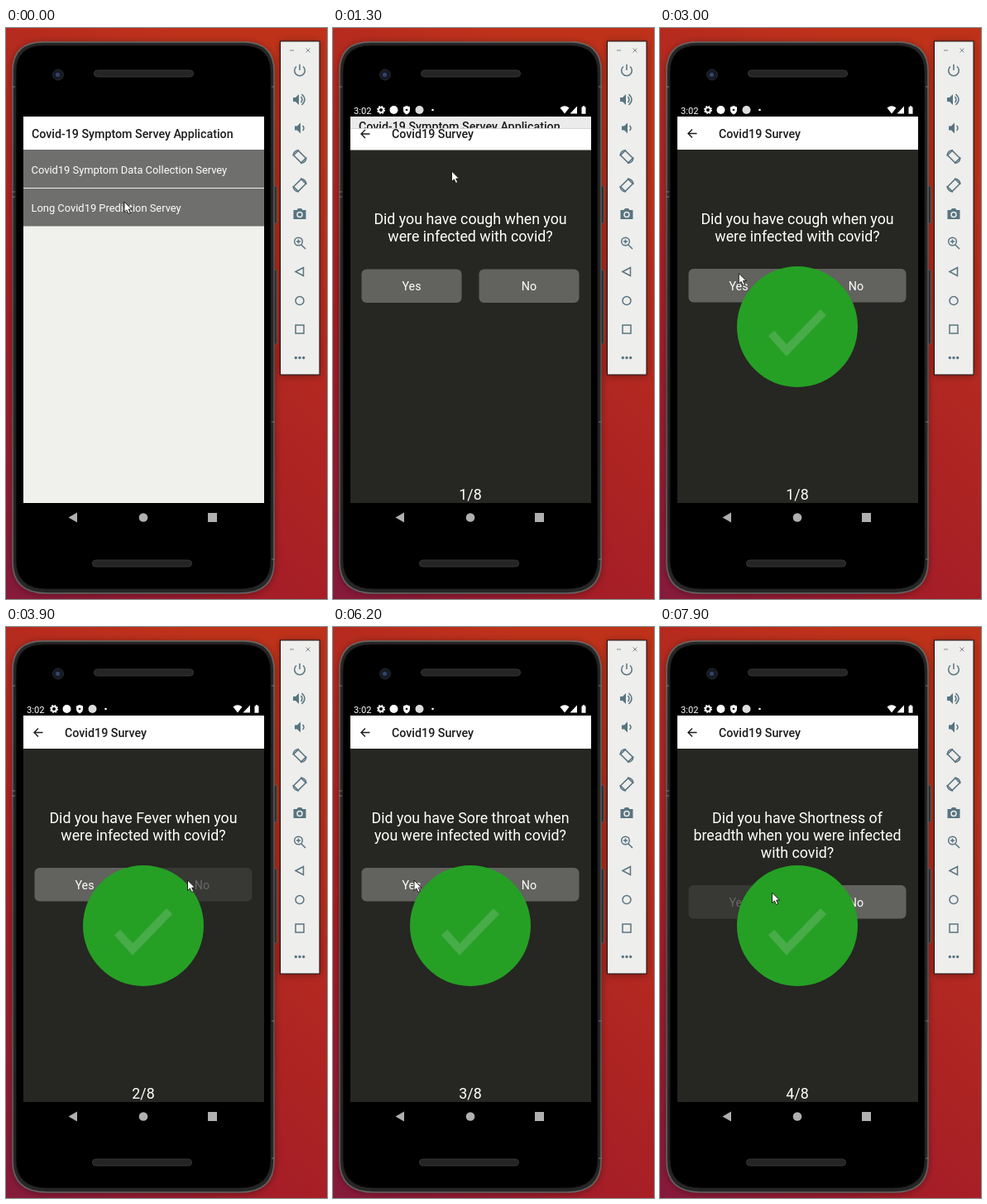
Write an HTML page that moves like this. It is 388x690 px and loops after 8000 ms.

```html
<!DOCTYPE html>
<html lang="en">
<head>
<meta charset="utf-8">
<title>Symptom survey</title>
<style>
  html, body { margin: 0; width: 100%; height: 100%; overflow: hidden; background: #b3271f; }
  svg { display: block; width: 388px; height: 690px; font-family: Roboto, sans-serif; }
  .title { font-size: 14.25px; font-weight: 500; fill: #1b1b1d; }
  .item { font-size: 12.9px; fill: #fff; }
  .question, .count { font-size: 17.8px; fill: #fff; text-anchor: middle; }
  .button { font-size: 14.25px; fill: #fff; text-anchor: middle; }
  .button rect { fill: #62625f; }
  .line { fill: none; stroke: #587480; stroke-width: 1.5; }
  .solid { fill: #587480; }
</style>
</head>
<body>
<svg viewBox="0 0 388 690">
  <defs>
    <linearGradient id="wall" x1="0" y1="1" x2=".55" y2="0">
      <stop offset="0" stop-color="#851a3c"/>
      <stop offset=".35" stop-color="#a51d27"/>
      <stop offset="1" stop-color="#bf321a"/>
    </linearGradient>
    <linearGradient id="rim" x1="0" y1="0" x2="0" y2="1">
      <stop offset="0" stop-color="#686866"/>
      <stop offset=".5" stop-color="#50504e"/>
      <stop offset="1" stop-color="#636361"/>
    </linearGradient>
    <filter id="shadow" x="-20%" y="-10%" width="140%" height="120%">
      <feDropShadow dx="0" dy="1" stdDeviation="4" flood-opacity=".35"/>
    </filter>
    <clipPath id="screen"><rect x="21" y="107" width="291" height="467"/></clipPath>
    <clipPath id="reveal"><rect id="revealBox" x="20" y="107" width="293" height="468"/></clipPath>
  </defs>

  <rect width="388" height="690" fill="url(#wall)"/>

  <!-- phone -->
  <g fill="#3a3a3a" stroke="#777" stroke-width=".7">
    <rect x="322" y="191" width="5.5" height="45" rx="1.5"/>
    <rect x="322" y="292" width="5.5" height="90" rx="1.5"/>
  </g>
  <path d="M8 52Q8 17 45 17H287Q324 17 324 52V645Q324 683 283 683H49Q8 683 8 645Z" fill="#282827" stroke="url(#rim)" stroke-width="1.600" filter="url(#shadow)"/>
  <path d="M12 54Q12 21 46 21H286Q320 21 320 54V643Q320 678 282 678H50Q12 678 12 643Z" fill="#000" stroke="#181818"/>
  <path d="M7 71h4M7 198h4M7 204h4M321 71h4M321 476h4M321 642h4" stroke="#777"/>
  <g fill="#242424" stroke="#363636">
    <rect x="106.500" y="51" width="120" height="8" rx="4"/>
    <rect x="104.500" y="643" width="120" height="8" rx="4"/>
  </g>
  <circle cx="63" cy="56.500" r="6.500" fill="#151a24" stroke="#25282e"/>
  <circle cx="62.500" cy="56.500" r="2.500" fill="#34466e"/>
  <g fill="#b0b0b0">
    <path d="M75.500 591.500L86 585.500V597.500Z"/>
    <circle cx="166" cy="591.500" r="5.300"/>
    <rect x="244" y="586" width="11" height="11"/>
  </g>

  <g id="status" fill="#fff">
    <text x="25" y="103.500" font-size="11.200">3:02</text>
    <circle cx="58" cy="99" r="3" fill="none" stroke="#fff" stroke-width="2"/>
    <circle cx="58" cy="99" r="4.300" fill="none" stroke="#fff" stroke-width="1.500" stroke-dasharray="1.700 1.680"/>
    <circle cx="73.500" cy="99" r="5"/>
    <path d="M89 94l4 1.500v3.500q0 3.500-4 5.500q-4-2-4-5.500v-3.500z"/>
    <circle cx="89" cy="99" r="1.300" fill="#000"/>
    <circle cx="104.500" cy="99" r="5" fill="#ddd"/>
    <circle cx="120.500" cy="99" r="1.300"/>
    <path d="M274.500 96.500Q280 92 285.500 96.500L280 103.500ZM295 94.500V103.500H286.500ZM300.500 95.500h1.300v-1.200h2.400v1.200h1.300v8.300h-5z"/>
  </g>

  <!-- app -->
  <g clip-path="url(#screen)">
    <g id="home">
      <rect x="20" y="107" width="293" height="468" fill="#f0f1ed"/>
      <g id="menu">
        <rect x="20" y="97" width="293" height="50" fill="#fff"/>
        <text class="title" x="31" y="133">Covid-19 Symptom Servey Application</text>
        <g id="firstItem">
          <rect x="20" y="147" width="293" height="46" fill="#6f6f6d"/>
          <text class="item" x="30.500" y="175.500">Covid19 Symptom Data Collection Servey</text>
        </g>
        <rect x="20" y="194" width="293" height="45.500" fill="#6f6f6d"/>
        <text class="item" x="30.500" y="222">Long Covid19 Prediction Servey</text>
      </g>
      <rect id="shade" x="20" y="107" width="293" height="468"/>
    </g>

    <g clip-path="url(#reveal)">
      <rect x="20" y="107" width="293" height="468" fill="#262622"/>
      <g id="survey">
        <rect x="20" y="90" width="293" height="57" fill="#fff"/>
        <path d="M44.500 127.500H34M39 122.500L34 127.500L39 132.500" fill="none" stroke="#1b1b1d" stroke-width="1.400"/>
        <text class="title" x="71" y="133">Covid19 Survey</text>
        <g id="question" class="question"></g>
        <g id="buttons">
          <g class="button" id="yes"><rect x="34.500" y="291" width="121" height="40.500" rx="6"/><text x="95" y="317">Yes</text></g>
          <g class="button" id="no"><rect x="176.500" y="291" width="121" height="40.500" rx="6"/><text x="237" y="317">No</text></g>
        </g>
        <text id="count" class="count" x="166" y="570"></text>
        <g id="done">
          <circle cx="166" cy="361" r="73" fill="#25a025"/>
          <path d="M134.500 369L153 389.500L197.500 343.500" fill="none" stroke="#48ac48" stroke-width="10"/>
        </g>
      </g>
    </g>
  </g>

  <!-- emulator toolbar -->
  <rect x="331.500" y="16" width="47.500" height="403" fill="#eeeeec" stroke="#1a1010" filter="url(#shadow)"/>
  <path d="M343 27h5M362.500 24.500l5 5M367.500 24.500l-5 5" stroke="#7d8a90"/>
  <g transform="translate(355 0)">
    <path class="line" d="M0 44V51M-4 46.500A6.300 6.300 0 1 0 4 46.500"/>
    <path class="solid" d="M-8 84h3l4-4v13l-4-4h-3zM-6 118.500h3l4-4v13l-4-4h-3z"/>
    <path class="line" d="M1.500 83q3 3.500 0 7M2.500 80q7 6.500 0 13M3.500 118q3 3 0 6"/>
    <g id="rotate" class="line">
      <rect x="-4" y="-6.500" width="8" height="13" transform="translate(0 155.500) rotate(-45)"/>
      <path d="M-8 154.500Q-7.500 148 -1 147.500M1 163.500Q7.500 163 8 156.500"/>
    </g>
    <use href="#rotate" transform="translate(0 34.500) scale(-1 1)"/>
    <path class="solid" d="M-7.500 220h4l1.500-2h4l1.500 2h4v11h-15z"/>
    <circle cy="225.500" r="3" fill="#587480" stroke="#eee" stroke-width="1.500"/>
    <path class="line" d="M2 262L7 267M-4 258h5M-1.500 255.500v5"/>
    <circle class="line" cx="-1.500" cy="258" r="4.800"/>
    <path class="line" d="M-5 294.500L4.500 289.500V299.500Z"/>
    <circle class="line" cy="329.500" r="5"/>
    <rect class="line" x="-5" y="359" width="10" height="10"/>
    <path d="M-4.700 398.500h.01M0 398.500h.01M4.700 398.500h.01" stroke="#587480" stroke-width="3.400" stroke-linecap="round"/>
  </g>

  <path id="cursor" d="M0 0V12.500L2.900 9.900L5 14.500L7.200 13.500L5.200 9H9Z" fill="#fff" stroke="#111" stroke-width=".9"/>
</svg>
<script>
const LOOP = 8000, STEP = 100;
const OPEN = 1060, OPEN_TIME = 412, STATUS_AT = 1000;

// Each question appears at `from`; its answer is tapped at `tap`.
const questions = [
  { from: 0, tap: 2400, answer: 'yes', lines: ['Did you have cough when you', 'were infected with covid?'] },
  { from: 3100, tap: 3900, answer: 'no', lines: ['Did you have Fever when you', 'were infected with covid?'] },
  { from: 4600, tap: 5800, answer: 'yes', lines: ['Did you have Sore throat when', 'you were infected with covid?'] },
  { from: 6500, tap: 7900, answer: 'yes', lines: ['Did you have Shortness of', 'breadth when you were infected', 'with covid?'] },
];

// Pointer stops: time, x, y
const stops = [
  [0, 143, 210], [300, 143, 210], [800, 143.5, 173], [1400, 143.5, 173],
  [2100, 88, 296], [2900, 88, 296], [3600, 219.5, 306], [4400, 219.5, 306],
  [5300, 98, 306], [6200, 98, 306], [6900, 154, 312], [7300, 154, 312],
  [7700, 135.5, 321], [8000, 135.5, 321],
];

const el = id => document.getElementById(id);
const clamp = v => Math.min(1, Math.max(0, v));
const smooth = u => u * u * (3 - 2 * u);
const shift = (id, x, y) => el(id).setAttribute('transform', `translate(${x} ${y})`);
const show = (id, on) => el(id).style.display = on ? '' : 'none';

function pointerAt(t) {
  const i = stops.findIndex(s => s[0] > t);
  const [t0, x0, y0] = stops[i - 1], [t1, x1, y1] = stops[i];
  const k = smooth((t - t0) / (t1 - t0));
  return [x0 + (x1 - x0) * k, y0 + (y1 - y0) * k];
}

// Opacity of a control tapped at the given time: dims, then recovers
const pressed = (t, tap, low) => t < tap ? 1 : low + (1 - low) * clamp((t - tap - 150) / 250);

let current;
function setQuestion(q) {
  if (q === current) return;
  current = q;
  el('question').innerHTML = q.lines.map((s, i) => `<text x="166" y="${237 + i * 21}">${s}</text>`).join('');
  el('count').textContent = `${questions.indexOf(q) + 1}/8`;
  shift('buttons', 0, (q.lines.length - 2) * 21);
}

function draw(t) {
  const open = 1 - (1 - clamp((t - OPEN) / OPEN_TIME)) ** 4;
  show('status', t >= STATUS_AT);
  show('home', open < 1);
  shift('menu', 0, -9 * open);
  el('firstItem').style.opacity = pressed(t, 1000, 0.72);
  el('shade').style.opacity = Math.min(0.08, open * 0.24);
  el('revealBox').setAttribute('y', 107 + 468 * (1 - open));
  shift('survey', 0, 16 * (1 - open));

  const q = questions.findLast(q => t >= q.from);
  setQuestion(q);
  for (const id of ['yes', 'no'])
    el(id).style.opacity = id === q.answer ? pressed(t, q.tap, 0.3) : 1;
  show('done', t >= q.tap);
  shift('cursor', ...pointerAt(t));
}

function tick() {
  draw(Math.floor(performance.now() % LOOP / STEP) * STEP);
  requestAnimationFrame(tick);
}
tick();
</script>
</body>
</html>
```
